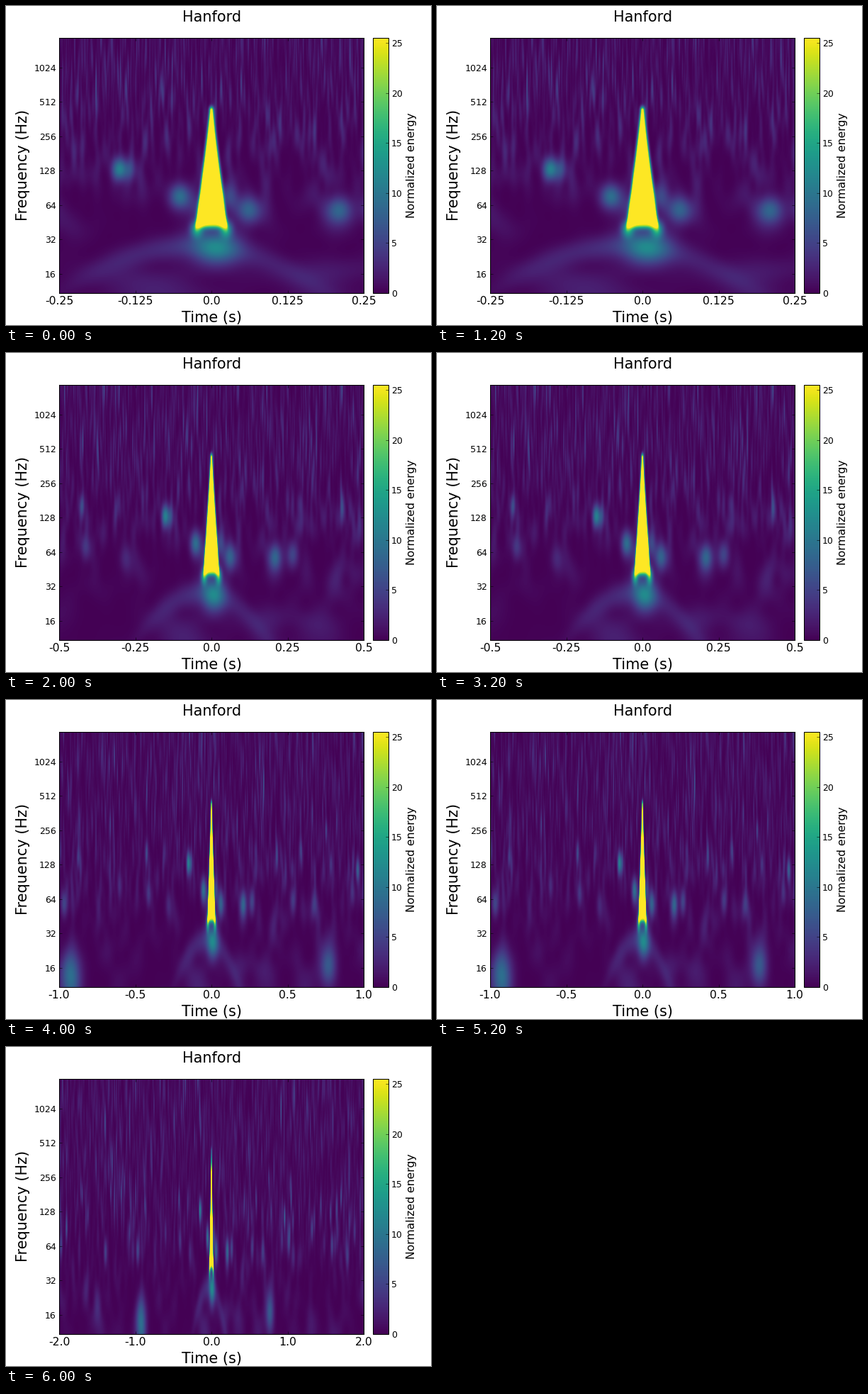
These frames come from a looping animation (600 px wide and 450 px high, 8 s). A matplotlib script:

```python
import numpy as np
import matplotlib.pyplot as plt
from matplotlib.animation import FuncAnimation

plt.rcParams["font.family"] = "DejaVu Sans"
plt.rcParams["axes.unicode_minus"] = False

WIDTH, HEIGHT, DPI = 600, 450, 100
SPANS = [0.25, 0.5, 1.0, 2.0]          # half width of the time axis, seconds
PEAK = 25.5
OCT_LOW, OCT_HIGH = 3.443, 10.866      # log2 of the frequency limits
ROWS, COLS, NOISE_COLS = 360, 430, 300
RATE, SAMPLES = 8192, 32768

rng = np.random.default_rng(14)
octaves = np.linspace(OCT_LOW, OCT_HIGH, ROWS)
u = octaves[:, None]

# Strongest glitches: time, frequency, energy
STRONG = [(-.152, 132, 10), (-.052, 76, 9), (.06, 58, 7), (.21, 58, 8),
          (.005, 27, 8), (-.92, 13, 8), (.77, 17, 7), (.963, 115, 7)]
WEAK = [(rng.uniform(-2, 2), 2 ** rng.uniform(5.7, 8), rng.uniform(2, 5))
        for _ in range(45)]


def bell(x, centre, width):
    return np.exp(-0.5 * ((x - centre) / width) ** 2)


def step(x, centre, width):
    return 1 / (1 + np.exp(-(x - centre) / width))


def noise_maps():
    """Energy of white noise seen through constant-Q windows, one map per span."""
    freqs = np.fft.fftfreq(SAMPLES, 1 / RATE)
    spectrum = rng.normal(size=SAMPLES) + 1j * rng.normal(size=SAMPLES)
    spectrum *= (freqs > 0) / np.sqrt(2)
    clock = (np.arange(SAMPLES) - SAMPLES / 2) / RATE
    fine = np.linspace(-1, 1, COLS)
    coarse = np.linspace(-1, 1, NOISE_COLS)
    maps = np.empty((len(SPANS), ROWS, COLS))
    for row, f in enumerate(2 ** octaves):
        window = bell(freqs, f, 0.2 * f)
        wave = np.fft.ifft(spectrum * window) * SAMPLES
        energy = np.abs(wave) ** 2 / np.sum(window ** 2)
        for k, span in enumerate(SPANS):
            maps[k, row] = np.interp(fine, coarse,
                                     np.interp(coarse * span, clock, energy))
    # Blur along frequency for tall, soft streaks
    blur = bell(octaves[:, None], octaves[None, :], 0.2)
    blur /= blur.sum(axis=1, keepdims=True)
    return (0.55 + 0.4 * step(u, 6.5, 0.3)) * (blur @ maps)


def chirp(t):
    """Saturated spike that narrows towards high frequency, on two soft feet."""
    apex, base = 8.75, 5.44
    reach = np.clip((apex - u) / (apex - base), 0, 1.05)
    gap = np.maximum(np.abs(t) - 0.023 * reach ** 1.1, 0)
    above = np.maximum(u - apex, 0)
    spike = 28 * bell(gap, 0, 0.0025) * bell(above, 0, 0.08) * step(u, 5.36, 0.05)
    feet = 13 * bell(np.abs(t), 0.024, 0.007) * bell(u, 5.3, 0.17)
    return spike + feet


def arch(t):
    """Faint bow below the spike."""
    ridge = 4.8 - 28 * (t + 0.03) ** 2
    return 3 * bell(u, ridge, 0.25) * bell(t, -0.02, 0.13)


def glitch(t, centre, f, energy):
    return energy * bell(t, centre, 0.3 / f ** 0.75) * bell(u, np.log2(f), 0.2 + 4 / f)


def signal_map(span):
    t = np.linspace(-span, span, COLS)[None, :]
    return chirp(t) + arch(t) + sum(glitch(t, *g) for g in STRONG + WEAK)


maps = [noise + signal_map(span) for noise, span in zip(noise_maps(), SPANS)]


def pixel_axes(x, y, w, h):
    ax = fig.add_axes([x / WIDTH, 1 - (y + h) / HEIGHT, w / WIDTH, h / HEIGHT])
    for spine in ax.spines.values():
        spine.set_linewidth(0.75)
    return ax


def label(x, y, text, size, rotation=0):
    fig.text(x / WIDTH, 1 - y / HEIGHT, text, fontsize=size, rotation=rotation,
             ha="center", va="baseline", rotation_mode="anchor")


fig = plt.figure(figsize=(WIDTH / DPI, HEIGHT / DPI), dpi=DPI, facecolor="white")
ax = pixel_axes(75, 45, 430, 360)
image = ax.imshow(maps[0], origin="lower", aspect="auto", cmap="viridis",
                  vmin=0, vmax=PEAK, interpolation="bilinear",
                  extent=[-1, 1, OCT_LOW, OCT_HIGH])
ticks = np.linspace(-1, 1, 5)
ax.set_xticks(ticks)
ax.set_yticks(range(4, 11), [str(2 ** n) for n in range(4, 11)])
style = dict(direction="in", length=3, width=0.4, pad=3)
ax.tick_params(top=True, right=True, **style)
ax.tick_params(axis="x", labelsize=11.25)
ax.tick_params(axis="y", labelsize=9)

bar = fig.colorbar(image, cax=pixel_axes(518, 45, 22, 360), ticks=range(0, 26, 5))
bar.outline.set_linewidth(0.75)
bar.ax.tick_params(labelsize=9, **style)

label(290.3, 22, "Hanford", 15)
label(290.3, 446, "Time (s)", 15)
label(29.5, 224, "Frequency (Hz)", 15, 90)
label(577.5, 225, "Normalized energy", 11.25, 90)


def draw(frame):
    image.set_data(maps[frame])
    ax.set_xticklabels([str(float(SPANS[frame] * tick)) for tick in ticks])
    return [image]


anim = FuncAnimation(fig, draw, frames=len(SPANS), interval=2000, repeat=True)
plt.show()
```
